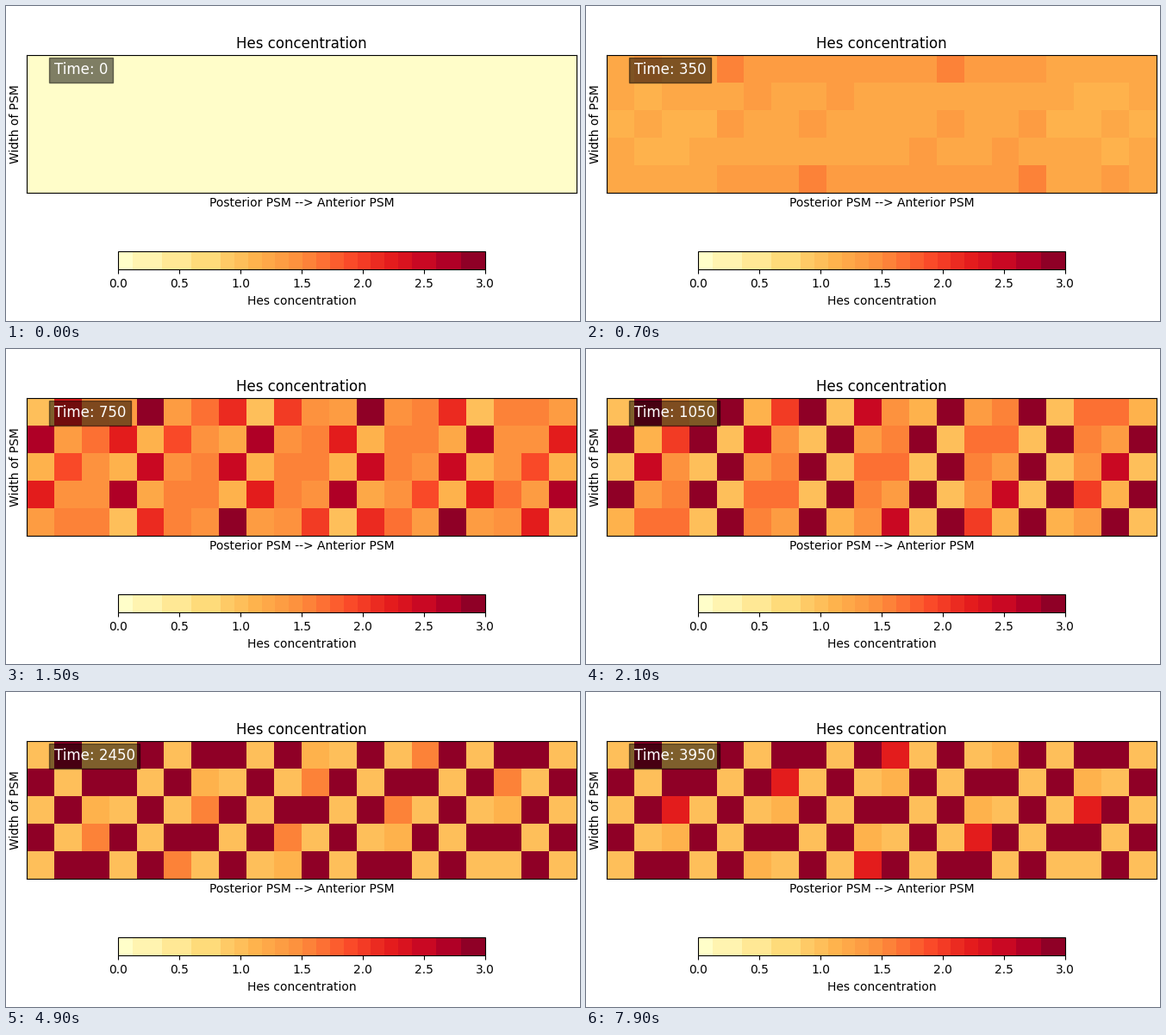
A matplotlib script that plays this animation: 666 by 366 pixels, repeating every 8000 ms.

```python
import numpy as np
import matplotlib.pyplot as plt
from matplotlib.animation import FuncAnimation
from matplotlib.cm import ScalarMappable
from matplotlib.colors import ListedColormap, Normalize

plt.rcParams["font.family"] = "DejaVu Sans"

W, H, DPI = 666, 366, 100
FRAMES, STEP_MS, DT = 80, 100, 50
ROWS, BLOCKS, LAYERS = 5, 5, 4
LOW, HIGH = 1.03, 3.0

# Each row of the picture holds five blocks of four layers.
row, block, layer = np.indices((ROWS, BLOCKS, LAYERS))
parity = (-1.0) ** (row + block + layer)
depth = layer - (LAYERS - 1) / 2
outer = np.abs(depth) > 1
diagonal = ROWS - 1 - row - block
from_edge = np.where(depth < 0, row, ROWS - 1 - row)
edge = 0.12 * (np.abs(row - 2) == 2) - 0.1 * (np.abs(block - 2) == 2)


def ease(u):
    u = np.clip(u, 0, 1)
    return u * u * (3 - 2 * u)


def polarity(t):
    """How far each cell has moved to its low (-1) or high (+1) fate."""
    # Outer layers decide first, in a wave across the rows.
    lead = np.sign(depth) * np.tanh((t / (620 + 80 * from_edge)) ** 4)
    # Inner layers follow a tilted wall that slowly straightens.
    spread = 1.4 + max(t - 1800, 0) * 0.00116
    gain = min(2 * (t / 1800) ** 3, 6) * (1 + np.abs(diagonal)) / 2
    follow = np.tanh(gain * (depth - np.tanh(diagonal / spread)))
    return parity * np.where(outer, lead, follow)


def tissue(t):
    mid = 1.55 * (1 - np.exp(-t / 220)) + 0.5 * ease((t - 1400) / 2500)
    p = polarity(t)
    level = mid + np.where(p > 0, p * (HIGH - mid), p * max(mid - LOW, 0))
    level += edge * (1 - np.exp(-t / 150)) * np.exp(-(t / 650) ** 4)
    return level.reshape(ROWS, BLOCKS * LAYERS)


def banded_cmap(bands=21, size=600):
    edges = np.interp(np.arange(bands + 1), [0, 1, 4, 18, 21],
                      [0, 0.12, 0.84, 2.4, HIGH])
    mids = (edges[:-1] + edges[1:]) / 2
    mids[0] = 0.03
    levels = (np.arange(size) + 0.5) / size * HIGH
    band = np.searchsorted(edges, levels) - 1
    return ListedColormap(plt.get_cmap("YlOrRd")(mids[band] / HIGH))


def pixel_axes(x, y, w, h):
    return fig.add_axes([x / W, 1 - (y + h) / H, w / W, h / H])


fig = plt.figure(figsize=(W / DPI, H / DPI), dpi=DPI, facecolor="white")
cmap, norm = banded_cmap(), Normalize(0, HIGH)

ax = pixel_axes(24, 57.2, 638, 159.5)
image = ax.imshow(tissue(0), cmap=cmap, norm=norm, aspect="auto",
                  interpolation="nearest")
ax.set(xticks=[], yticks=[], title="Hes concentration",
       xlabel="Posterior PSM --> Anterior PSM", ylabel="Width of PSM")
clock = ax.text(0.05, 0.95, "Time: 0", transform=ax.transAxes, fontsize=12,
                color="white", va="top",
                bbox=dict(facecolor="black", alpha=0.5))

cax = pixel_axes(130, 285.15, 426, 21.3)
bar = fig.colorbar(ScalarMappable(norm, cmap), cax=cax,
                   orientation="horizontal", ticks=np.arange(0, 3.1, 0.5))
bar.set_label("Hes concentration")


def update(i):
    t = i * DT
    image.set_data(tissue(t))
    clock.set_text(f"Time: {t}")
    return image, clock


anim = FuncAnimation(fig, update, frames=FRAMES, interval=STEP_MS,
                     repeat=True, repeat_delay=0)
plt.show()
```
